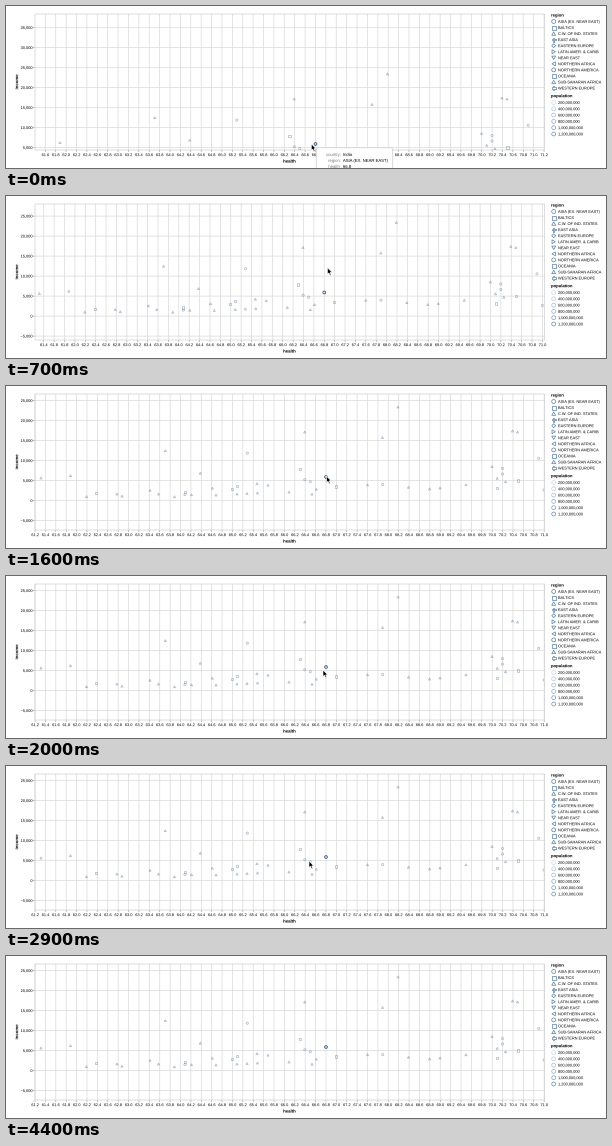
These frames come from a looping animation (600 px wide and 162 px high, 5500 ms). A matplotlib script:

```python
import numpy as np
import matplotlib.pyplot as plt
from matplotlib.animation import FuncAnimation
from matplotlib.collections import LineCollection, PolyCollection
from matplotlib.patches import FancyBboxPatch, PathPatch, Polygon, Rectangle
from matplotlib.textpath import TextPath
from matplotlib.transforms import Affine2D

W, H, DPI = 600, 162, 100
STEP, LOOP = 100, 5500
PX = 72 / DPI
LEFT, RIGHT, TOP, BOTTOM = 29, 538.4, 8, 144
BLUE, GRID, TICK = "#4c78a8", "#d9d9d9", "#8a8a8a"

# Resting view: pixel = origin + scale * value
X66, Y0 = 278.4, 114.6
X_SCALE, Y_SCALE = 51.95, -0.004

# Country marks as pixel positions in the resting view
MARKS = {
    "up": [(35, 92), (64.5, 89.7), (80.5, 110.7), (111, 108), (116, 110.2),
           (144, 104.3), (152.5, 108), (159.3, 64.7), (168.5, 110.8),
           (185.5, 108.8), (194.3, 87.2), (206.3, 102.2), (210, 109),
           (231, 108), (241, 107.5), (251, 97.7), (251.5, 107),
           (262, 99.2), (283, 106), (298.7, 46), (306, 108.2),
           (310.3, 103.2), (361.5, 98.8), (376.5, 51.5), (392, 21),
           (402.5, 101.2), (423.5, 103), (434, 102), (460, 98.8),
           (486, 80.5), (491.2, 92.3), (499.5, 95.7), (506.5, 45),
           (511.5, 46)],
    "square": [(90.3, 107.2), (179, 106), (225.7, 102.7), (230.8, 99.8),
               (294, 83), (330, 100.5), (491.3, 102), (512, 94.4)],
    "circle": [(179, 108.6), (241.3, 67.2), (298.8, 93.7), (304.3, 95.7),
               (376.7, 98.6), (496.5, 82.5), (496.5, 88), (532.7, 72.3),
               (538, 104)],
}
INDIA = (320, 91)

REGIONS = [
    ("ASIA (EX. NEAR EAST)", "circle"), ("BALTICS", "square"),
    ("C.W. OF IND. STATES", "up"), ("EAST ASIA", "cross"),
    ("EASTERN EUROPE", "diamond"), ("LATIN AMER. & CARIB", "right"),
    ("NEAR EAST", "down"), ("NORTHERN AFRICA", "left"),
    ("NORTHERN AMERICA", "circle"), ("OCEANIA", "square"),
    ("SUB-SAHARAN AFRICA", "up"), ("WESTERN EUROPE", "cross"),
]

FIELDS = ("country", "region", "health", "income", "population")
TIPS = {
    "india": ("India", "ASIA (EX. NEAR EAST)", "66.8", "5903", "1311050527"),
    "pakistan": ("Pakistan", "ASIA (EX. NEAR EAST)", "66.5", "4743",
                 "188924874"),
    "fiji": ("Fiji", "OCEANIA", "66.3", "7925", "892145"),
}

# (start ms, pointer tip, hovered country)
POINTER = [
    (0, (305.3, 137.8), "india"), (200, (307.5, 130), None),
    (300, (312, 117), None), (500, (313.4, 105.2), None),
    (600, (317, 88), None), (700, (321.4, 71.6), None),
    (1100, (321, 76), None), (1200, (320.7, 84), None),
    (1300, (320.5, 89.5), None), (1600, (320.5, 90), None),
    (1700, (320.2, 91.3), "india"), (2000, (317, 94), None),
    (2100, (310, 96), None), (2200, (304.2, 96.3), "pakistan"),
    (2400, (305.3, 93.6), None), (2500, (304.2, 96.3), "pakistan"),
    (2900, (303, 95), None), (3000, (299, 92), None),
    (3100, (296, 87), None), (3200, (293.6, 84), None),
    (3300, (293.5, 83.2), "fiji"), (4200, (228, 88), None),
    (4300, (62.5, 92), None), (4400, None, None),
]

# Distance of the view from rest while it is dragged
PAN_T = (400, 500, 600, 700, 800, 900, 1000)
PAN_X = (-10.5, -10.6, -6, -1.7, -0.9, -0.4, 0)
PAN_Y = (47, 44.2, 24, 5.5, 2.8, 1.2, 0)

fig = plt.figure(figsize=(W / DPI, H / DPI), dpi=DPI, facecolor="white")
ax = fig.add_axes([0, 0, 1, 1])
ax.set_xlim(0, W)
ax.set_ylim(H, 0)
ax.axis("off")

plot_area = Rectangle((LEFT, TOP), RIGHT - LEFT, BOTTOM - TOP, fill=False,
                      ec="#cfcfcf", lw=0.7 * PX, snap=False, zorder=3)
ax.add_patch(plot_area)

glyphs = {}


def text(x, y, s, size=3.9, ha="left", color="black", weight="normal",
         angle=0, zorder=5):
    """Draw s with its capitals centred on y, at sub-pixel precision."""
    key = (s, size, weight)
    if key not in glyphs:
        font = {"family": "Liberation Sans", "weight": weight}
        path = TextPath((0, 0), s, size=size, prop=font)
        glyphs[key] = path, path.get_extents().x1
    path, width = glyphs[key]
    shift = {"left": 0, "center": width / 2, "right": width}[ha]
    place = (Affine2D().translate(-shift, -0.36 * size).scale(1, -1)
             .rotate_deg(angle).translate(x, y))
    return ax.add_patch(PathPatch(place.transform_path(path), fc=color,
                                  lw=0, zorder=zorder))


def marker(kind, x, y, r):
    """Outline of a plotting symbol inside a square of half-width r."""
    if kind == "circle":
        a = np.linspace(0, 2 * np.pi, 28, endpoint=False)
        pts = np.column_stack([np.cos(a), np.sin(a)])
    elif kind == "square":
        pts = np.array([(-1, -1), (1, -1), (1, 1), (-1, 1)])
    elif kind == "diamond":
        pts = np.array([(0, -1), (1, 0), (0, 1), (-1, 0)])
    elif kind == "cross":
        arm = np.array([(-0.4, -1), (0.4, -1), (0.4, -0.4)])
        turns = [np.array([(0, 1), (-1, 0)])]
        pts = np.vstack([arm @ np.linalg.matrix_power(turns[0], k)
                         for k in range(4)])
    else:
        turn = {"up": 0, "right": 90, "down": 180, "left": 270}[kind]
        pts = Affine2D().rotate_deg(turn).transform(
            [(0, -0.87), (-1, 0.87), (1, 0.87)])
    return np.asarray(pts) * r + (x, y)


def outlines(polys, width, alpha, color=BLUE, zorder=4):
    return ax.add_collection(PolyCollection(
        polys, facecolors="none", edgecolors=color, linewidths=width * PX,
        alpha=alpha, zorder=zorder))


def lines(segments, color, width, zorder):
    item = LineCollection(segments, colors=color, linewidths=width * PX,
                          zorder=zorder)
    item.set_snap(False)
    return ax.add_collection(item)


def draw_legend():
    text(545, 9, "region", 4.2, weight="bold")
    for i, (name, kind) in enumerate(REGIONS):
        y = 15.5 + 6.05 * i
        outlines([marker(kind, 547.7, y, 1.95)], 0.7, 0.95)
        text(552, y, name)
    text(545, 89.7, "population", 4.2, weight="bold")
    for i in range(6):
        y = 96.5 + 6.3 * i
        outlines([marker("circle", 547.7, y, 1.95)], 0.65, 0.3 + 0.12 * i)
        text(552, y, f"{(i + 1) * 200_000_000:,}")


def ticks(low, high, step):
    return np.arange(np.ceil(low / step), np.floor(high / step) + 1) * step


def draw_axes(dx, dy):
    x0, y0 = X66 + dx, Y0 + dy
    items, grid, marks = [], [], []
    for v in ticks(66 + (LEFT - x0) / X_SCALE, 66 + (RIGHT - x0) / X_SCALE,
                   0.2):
        x = x0 + (v - 66) * X_SCALE
        grid.append([(x, TOP), (x, BOTTOM)])
        marks.append([(x, BOTTOM), (x, BOTTOM + 2)])
        items.append(text(x, 148.7, f"{v:.1f}", ha="center"))
    for v in ticks((BOTTOM - y0) / Y_SCALE, (TOP - y0) / Y_SCALE, 5000):
        y = y0 + v * Y_SCALE
        grid.append([(LEFT, y), (RIGHT, y)])
        marks.append([(LEFT - 2, y), (LEFT, y)])
        label = f"{v + 0:,.0f}".replace("-", "\u2212")
        items.append(text(26.4, y, label, ha="right"))
    return items + [lines(grid, GRID, 0.7, 1), lines(marks, TICK, 0.5, 2)]


def draw_marks(dx, dy):
    small = [marker(kind, x + dx, y + dy, 1.1)
             for kind, places in MARKS.items() for x, y in places]
    india = [marker("circle", INDIA[0] + dx, INDIA[1] + dy, 1.35)]
    items = [outlines(small, 0.75, 0.5, "#5f7c9e"),
             outlines(india, 0.95, 1, "#3f648f")]
    for item in items:
        item.set_clip_path(plot_area)
    return items


def draw_tooltip(tip, rows):
    x, y = tip[0] + 5.4, tip[1] + 4.1
    values = [text(x + 26.2, y + 6.5 + 6 * i, v, 4.2, zorder=9)
              for i, v in enumerate(rows)]
    width = 26.2 + glyphs[(rows[1], 4.2, "normal")][1] + 4.6
    keys = [text(x + 23.9, y + 6.5 + 6 * i, f"{f}:", 4.2, "right",
                 "#757575", zorder=9) for i, f in enumerate(FIELDS)]
    style = "round,pad=0,rounding_size=1.2"
    shadow = [FancyBboxPatch((x - g, y + 0.8 - g), width + 2 * g,
                             36.8 + 2 * g, boxstyle=style, fc="black", lw=0,
                             alpha=0.05, zorder=7) for g in (0, 0.6, 1.2)]
    box = FancyBboxPatch((x, y), width, 36.8, boxstyle=style, fc="white",
                         ec="#d4d4d4", lw=0.5 * PX, zorder=8)
    return values + keys + [ax.add_patch(p) for p in shadow + [box]]


def draw_pointer(tip):
    arrow = np.array([(0, 0), (0, 6.6), (1.5, 5.3), (2.6, 7.8), (3.7, 7.3),
                      (2.7, 4.9), (4.7, 4.8)])
    return ax.add_patch(Polygon(arrow + tip, fc="black", ec="white",
                                lw=0.6 * PX, zorder=10))


draw_legend()
text(283.3, 155, "health", 4.3, "center", weight="bold")
text(10.6, 76, "income", 4.3, "center", weight="bold", angle=-90)

state = {"pan": None, "view": [], "overlay": []}


def replace(layer, items):
    for item in state[layer]:
        item.remove()
    state[layer] = items


def update(frame):
    t = frame * STEP
    pan = np.interp(t, PAN_T, PAN_X), np.interp(t, PAN_T, PAN_Y)
    if t < PAN_T[1]:
        pan = PAN_X[0], PAN_Y[0]
    if pan != state["pan"]:
        replace("view", draw_axes(*pan) + draw_marks(*pan))
        state["pan"] = pan
    _, tip, country = [p for p in POINTER if p[0] <= t][-1]
    overlay = [draw_pointer(tip)] if tip else []
    if country:
        overlay += draw_tooltip(tip, TIPS[country])
    replace("overlay", overlay)
    return []


anim = FuncAnimation(fig, update, frames=LOOP // STEP, interval=STEP,
                     init_func=lambda: [], repeat=True, repeat_delay=0)
plt.show()
```
